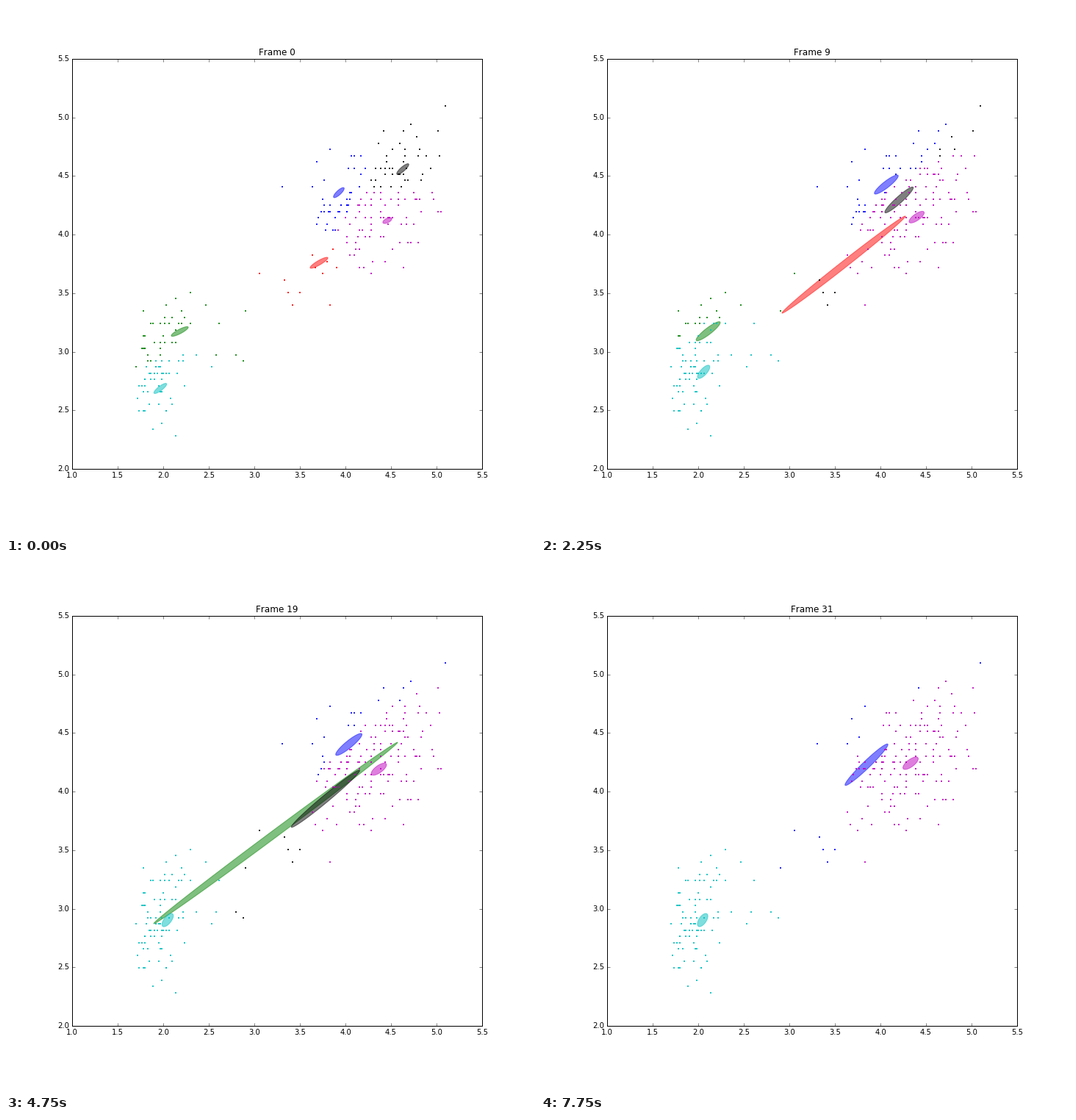
These frames come from a looping animation (720 by 720 pixels, 8000 ms). A matplotlib script:

```python
import numpy as np
import matplotlib.pyplot as plt
from matplotlib.animation import FuncAnimation
from matplotlib.patches import Polygon

plt.rcParams.update({
    "font.family": "DejaVu Sans",
    "text.kerning_factor": 6,
    "ytick.alignment": "center",
})

FRAMES, INTERVAL = 32, 250
SETTLE = 7  # steps of the opening phase
SCALE = np.array([558 / 4.5, 558 / 3.5])  # pixels per data unit


class Cluster:
    """A Gaussian that moves from start to settled to final pose.

    A pose is centre x, y and the offset of the long tip, in pixels.
    The weight pair is the share of points at the start and at the end.
    """

    def __init__(self, color, start, settled, final, weight,
                 end=FRAMES - 1, ease=1, last=FRAMES - 1, spread=2):
        self.color, self.weight, self.spread = color, weight, spread
        self.poses = [np.array(p, float) for p in (start, settled, final)]
        self.end, self.ease, self.last = end, ease, last

    def pose(self, step):
        start, settled, final = self.poses
        if step <= SETTLE:
            pose = start + (settled - start) * step / SETTLE
        else:
            t = ((step - SETTLE) / (self.end - SETTLE)) ** self.ease
            # the centre stops at its goal, the length keeps growing
            amount = np.array([min(t, 1)] * 2 + [t] * 2)
            pose = settled + (final - settled) * amount
        center = [1, 2] + (pose[:2] * [1, -1] + [-90, 630]) / SCALE
        tip = pose[2:]
        thick = 5 - 2 * np.exp(-step / 7)
        side = thick * np.array([-tip[1], tip[0]]) / np.hypot(*tip)
        return center, tip / SCALE, side / SCALE

    def outline(self, step):
        center, tip, side = self.pose(step)
        t = np.linspace(0, 2 * np.pi, 120, endpoint=False)[:, None]
        return center + np.cos(t) * tip + np.sin(t) * side

    def score(self, pts, step):
        if step > self.last:
            return np.full(len(pts), -np.inf)
        center, tip, side = self.pose(step)
        square = np.outer(tip, tip) + np.outer(side, side)
        area = np.sqrt(np.linalg.det(square))
        # closed-form square root of a 2x2 matrix
        root = (square + area * np.eye(2)) / np.sqrt(np.trace(square) + 2 * area)
        cov = self.spread * root
        d = pts - center
        dist = np.einsum("ij,jk,ik->i", d, np.linalg.inv(cov), d)
        weight = np.interp(step, [0, self.last + 1], self.weight)
        return np.log(weight) - 0.5 * (np.log(np.linalg.det(cov)) + dist)


clusters = [
    Cluster("b", (453, 254, 7, 6.5), (470, 243, 16, 12.5), (443, 274.5, 29, 28),
            (.14, .18), ease=3),
    Cluster("g", (236.5, 443, 11.5, 6), (226, 443.5, 15.5, 12), (367, 367.5, 79, 59),
            (.17, 0), end=16, ease=3, last=19),
    Cluster("r", (426, 349.5, 12, 7), (415, 350, 67, 53), (412, 352, 84, 66),
            (.08, 0), end=9, last=9),
    Cluster("c", (210, 520.5, 8.5, 6.5), (222, 503, 8, 8.5), (220, 486, 7, 8.5),
            (.17, .35), end=16, ease=.8, spread=1.3),
    Cluster("m", (519, 292, 6, 3), (512, 288.7, 10, 7), (503, 272.5, 10, 7.5),
            (.27, .49)),
    Cluster("k", (540, 222, 8, 7), (490.5, 260.5, 17.5, 16), (384, 376, 73, 59.5),
            (.17, .12), end=25, ease=1.6, last=25),
]


def group(rng, x, slope, mid, low, high):
    """Waiting time follows duration with noise; values lie on a coarse grid."""
    wait = mid[1] + slope * (x - mid[0]) + rng.normal(0, 5.5, len(x))
    pts = np.column_stack([np.round(x * 60) / 60, np.round(wait)])
    return pts[np.all((pts >= low) & (pts <= high), axis=1)]


rng = np.random.default_rng(5)
# the few points between and beyond the two groups: duration, waiting time
loners = [(2.8, 56), (2.88, 55), (2.9, 63), (3.06, 69), (3.33, 68), (3.37, 66),
          (3.5, 66), (3.42, 64), (3.83, 64), (3.31, 83), (5.1, 96)]
points = np.vstack([
    loners,
    group(rng, 1.65 + rng.gamma(2.5, .15, 95), 6, (2.03, 54.5), (1.6, 43), (2.65, 71)),
    group(rng, rng.normal(4.3, .4, 172), 5.5, (4.3, 80), (3.4, 69), (5.07, 94)),
])
points[:, 1] = 2.285 + .0531 * (points[:, 1] - 43)

fig = plt.figure(figsize=(10, 10), dpi=72, facecolor="white")
ax = fig.add_axes([.125, .125, .775, .775])
ax.set_xticks(np.arange(1, 5.6, .5))
ax.set_yticks(np.arange(2, 5.6, .5))
ax.set_xlim(1, 5.5)
ax.set_ylim(2, 5.5)
ax.tick_params(direction="in", length=4, width=.5, pad=4, labelsize=10,
               top=True, right=True)
title = ax.set_title("Frame 0", fontsize=12, pad=5)
for spine in ax.spines.values():
    spine.set_linewidth(1)

shapes, dots = [], []
for c in clusters:
    shapes.append(ax.add_patch(Polygon(c.outline(0), closed=True, color=c.color,
                                       alpha=.5, lw=1)))
    dots += ax.plot([], [], "s", color=c.color, ms=2, mew=0, alpha=.85)


def draw(step):
    title.set_text(f"Frame {step}")
    owner = np.argmax([c.score(points, step) for c in clusters], axis=0)
    for i, (c, shape, dot) in enumerate(zip(clusters, shapes, dots)):
        shape.set_visible(step <= c.last)
        shape.set_xy(c.outline(step))
        dot.set_data(*points[owner == i].T)
    return [title, *shapes, *dots]


anim = FuncAnimation(fig, draw, frames=FRAMES, interval=INTERVAL, repeat=True)
plt.show()
```
